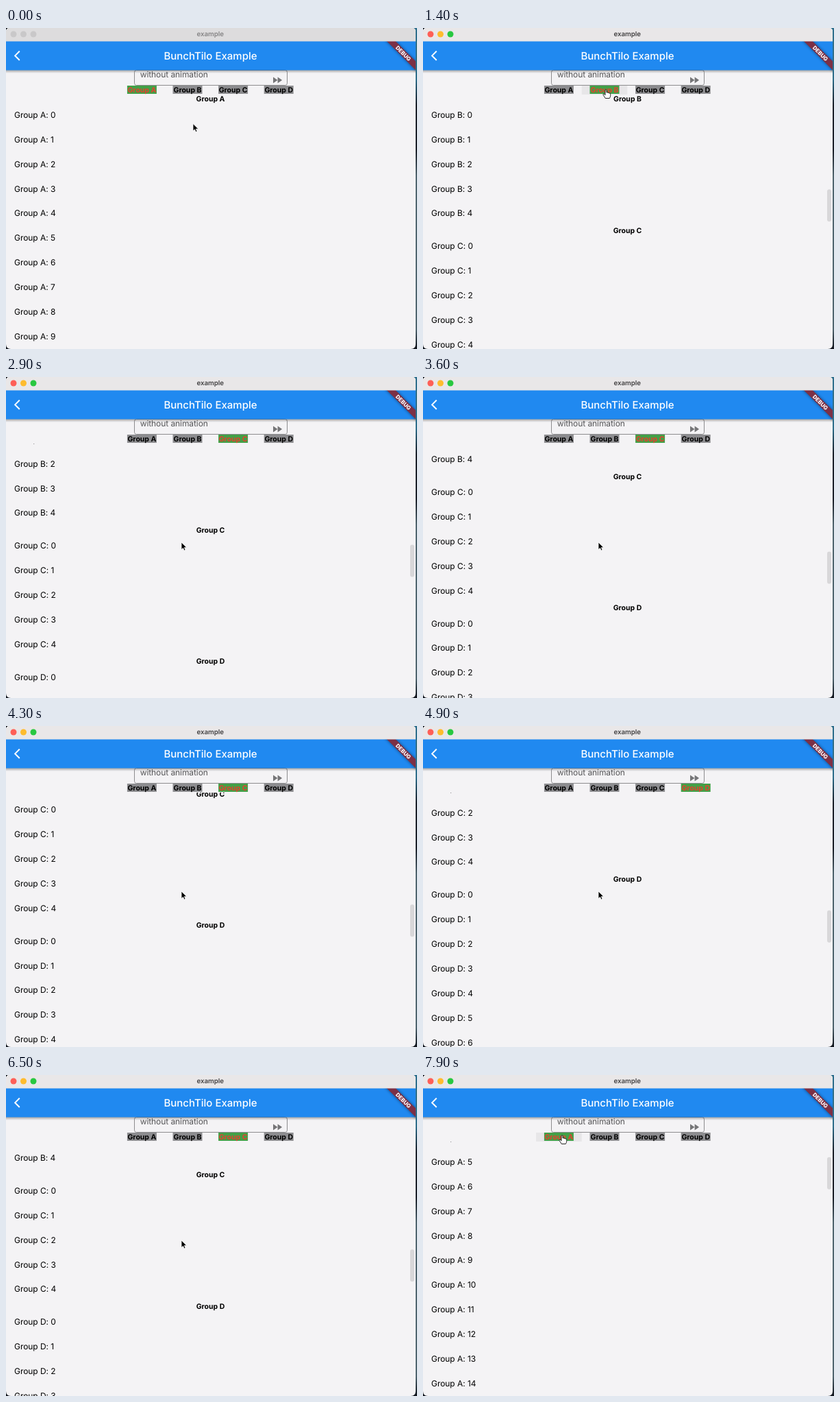
These frames come from a looping animation (600 px wide and 468 px high, 8 s). An HTML page:

```html
<!DOCTYPE html>
<html lang="en">
<head>
<meta charset="utf-8">
<title>Group list</title>
<style>
  html, body { margin: 0; width: 100%; height: 100%; overflow: hidden; background: #15181f; }
  svg { display: block; width: 600px; height: 468px; font-family: Inter, "Open Sans", sans-serif; }
  text { white-space: pre; text-rendering: geometricPrecision; }
  .item { font-size: 12px; fill: #000; letter-spacing: -.05px; }
  .head { font-size: 10.5px; font-weight: 700; text-anchor: middle; fill: #000; }
</style>
</head>
<body>
<svg viewBox="0 0 600 468">
  <defs>
    <clipPath id="window"><path d="M0 5Q0 0 5 0H593Q598 0 598 5V461Q598 468 591 468H7Q0 468 0 461Z"/></clipPath>
    <clipPath id="view"><rect y="97" width="598" height="371"/></clipPath>
    <clipPath id="page"><rect y="19" width="598" height="449"/></clipPath>
    <linearGradient id="shade" x2="0" y2="1">
      <stop stop-color="#000" stop-opacity=".34"/>
      <stop offset="1" stop-color="#000" stop-opacity="0"/>
    </linearGradient>
    <linearGradient id="desk" x2="0" y2="1">
      <stop stop-color="#2f6f8c"/><stop offset=".16" stop-color="#2f6f8c"/>
      <stop offset=".24" stop-color="#1c2029"/><stop offset=".38" stop-color="#1c2029"/>
      <stop offset=".46" stop-color="#50656f"/><stop offset=".94" stop-color="#50656f"/>
      <stop offset="1" stop-color="#10141c"/>
    </linearGradient>
    <filter id="blur" x="-20%" y="-80%" width="140%" height="260%"><feGaussianBlur stdDeviation="2"/></filter>
  </defs>
  <rect width="600" height="468" fill="#10141c"/>
  <rect x="590" width="10" height="468" fill="url(#desk)"/>
  <g clip-path="url(#window)">
    <rect width="598" height="468" fill="#f4f3f5"/>
    <g clip-path="url(#view)"><g id="list"></g></g>
    <rect id="thumb" x="590" width="6" height="47" rx="3" fill="#d8d7d9"/>

    <rect id="hover" y="84" width="66.6" height="13" fill="#e7e6e8"/>
    <g id="tabs"></g>
    <rect x="187.5" y="61.5" width="223" height="22" rx="3" fill="none" stroke="#8d8d8f"/>
    <text x="195.7" y="72.1" font-size="12" letter-spacing="-.08" fill="#565658">without animation</text>
    <path d="M390 71.6l6.5 4.5-6.5 4.5zM396.6 71.6l6.5 4.5-6.5 4.5z" fill="#757577"/>

    <rect y="61" width="598" height="5" fill="url(#shade)"/>
    <rect y="19" width="598" height="42.5" fill="#2089f0"/>
    <path d="M19.8 33.8l-6.6 6.6 6.6 6.6" fill="none" stroke="#fff" stroke-width="2"/>
    <text x="298.5" y="45.7" font-size="15" font-weight="500" text-anchor="middle" fill="#fff">BunchTilo Example</text>

    <g clip-path="url(#page)"><g transform="translate(598 19) rotate(45)">
      <rect x="-34" y="20.9" width="68" height="9" fill="#000" opacity=".5" filter="url(#blur)"/>
      <rect x="-34" y="20.9" width="68" height="9" fill="#7c3046"/>
      <text y="28.3" font-size="8" font-weight="800" text-anchor="middle" fill="#fff">DEBUG</text>
    </g></g>

    <rect id="bar" width="598" height="19.5"/>
    <g id="lights"></g>
    <text id="name" x="298.2" y="12" font-size="9.7" font-weight="600" text-anchor="middle">example</text>
  </g>
  <path id="arrow" d="M0 0V10.6L2.5 8.4 4.2 12.1 6 11.3 4.4 7.7H7.8Z" fill="#000" stroke="#fff" stroke-width=".8"/>
  <path id="hand" d="M-1 1Q0-.5 1 1V4.5Q2.3 3.6 3 5Q4.3 4.2 4.9 5.6Q6.7 5.2 6.7 7V9Q6.5 11 5.3 13H-.8Q-2 10.5-4 8.2Q-4.3 6.4-2.6 6.9L-1 8.3Z" fill="#fff" stroke="#111" stroke-width=".9" stroke-linejoin="round"/>
</svg>
<script>
const LOOP = 8000, ROW = 35.9, HEAD = 12, TOP = 97, VIEW = 371, TAB = 66.6, TAB_X = 165.1;
const FOCUS = 1200;
const $ = id => document.getElementById(id);

function add(parent, tag, attrs, text = '') {
  const el = document.createElementNS('http://www.w3.org/2000/svg', tag);
  for (const key in attrs) el.setAttribute(key, attrs[key]);
  el.textContent = text;
  return parent.appendChild(el);
}

let end = 0;
const groups = [['A', 30], ['B', 5], ['C', 5], ['D', 40]].map(([letter, count], i) => {
  const label = 'Group ' + letter, start = end, mid = TAB_X + TAB * (i + .5);
  add($('list'), 'text', { class: 'head', x: 298.5, y: TOP + start + 10.3 }, label);
  for (let n = 0; n < count; n++)
    add($('list'), 'text', { class: 'item', x: 12, y: TOP + start + HEAD + ROW * n + 21.8 }, `${label}: ${n}`);
  end += HEAD + ROW * count;
  return {
    start,
    box: add($('tabs'), 'rect', { x: mid - 21.5, y: 84, width: 43, height: 12 }),
    text: add($('tabs'), 'text', { class: 'head', x: mid, y: 94.3 }, label)
  };
});

const lights = ['#fe5f57', '#febc2e', '#28c840'].map((color, i) =>
  ({ color, el: add($('lights'), 'circle', { cx: 11 + 14.5 * i, cy: 9, r: 4.5 }) }));

// Keys are [time, ...values]; two keys at one time make a jump.
const scrollKeys = [
  [0, 0], [FOCUS, 0], [FOCUS, 1089], [2200, 1089], [2900, 1160.8], [3600, 1239.2],
  [4300, 1285], [4900, 1352.3], [5300, 1392], [5700, 1392], [6500, 1238.6],
  [6800, 1200], [7700, 1200], [7700, 179.5], [LOOP, 179.5]
];
const cursorKeys = [
  [0, 273, 139.5], [400, 273, 139.5], [1000, 267, 89.5], [1600, 267, 89.5],
  [2100, 256, 241], [6800, 256, 241], [7400, 203, 87.5], [LOOP, 203, 87.5]
];

function sample(keys, t, ease = u => u) {
  const i = keys.findIndex(k => k[0] > t), a = keys[i - 1], b = keys[i];
  const u = ease((t - a[0]) / (b[0] - a[0]));
  return a.slice(1).map((v, j) => v + (b[j + 1] - v) * u);
}

function draw(t) {
  const [scroll] = sample(scrollKeys, t);
  const [x, y] = sample(cursorKeys, t, u => u * u * (3 - 2 * u));
  const focused = t >= FOCUS;

  $('list').setAttribute('transform', `translate(0 ${-scroll})`);
  $('thumb').setAttribute('y', TOP + scroll * VIEW / end);
  $('thumb').style.opacity = focused ? 1 : 0;

  // The last heading above a third of the view marks the current tab.
  const current = groups.filter(g => g.start - scroll <= 121).length - 1;
  groups.forEach((g, i) => {
    g.box.style.fill = i === current ? '#43a047' : '#8c8c8f';
    g.text.style.fill = i === current ? '#e5402f' : '#000';
  });

  const tab = Math.floor((x - TAB_X) / TAB);
  const over = y > 84 && y < 97 && tab >= 0 && tab < groups.length;
  $('hover').setAttribute('x', TAB_X + TAB * tab);
  $('hover').style.opacity = over ? 1 : 0;
  for (const id of ['arrow', 'hand']) {
    $(id).setAttribute('transform', `translate(${x} ${y})`);
    $(id).style.display = (id === 'hand') === over ? '' : 'none';
  }

  $('bar').style.fill = focused ? '#e9e7e8' : '#dddcdd';
  $('name').style.fill = focused ? '#424142' : '#858485';
  lights.forEach(l => l.el.style.fill = focused ? l.color : '#c9c8c9');
}

function frame() {
  draw(performance.now() % LOOP);
  requestAnimationFrame(frame);
}
frame();
</script>
</body>
</html>
```
